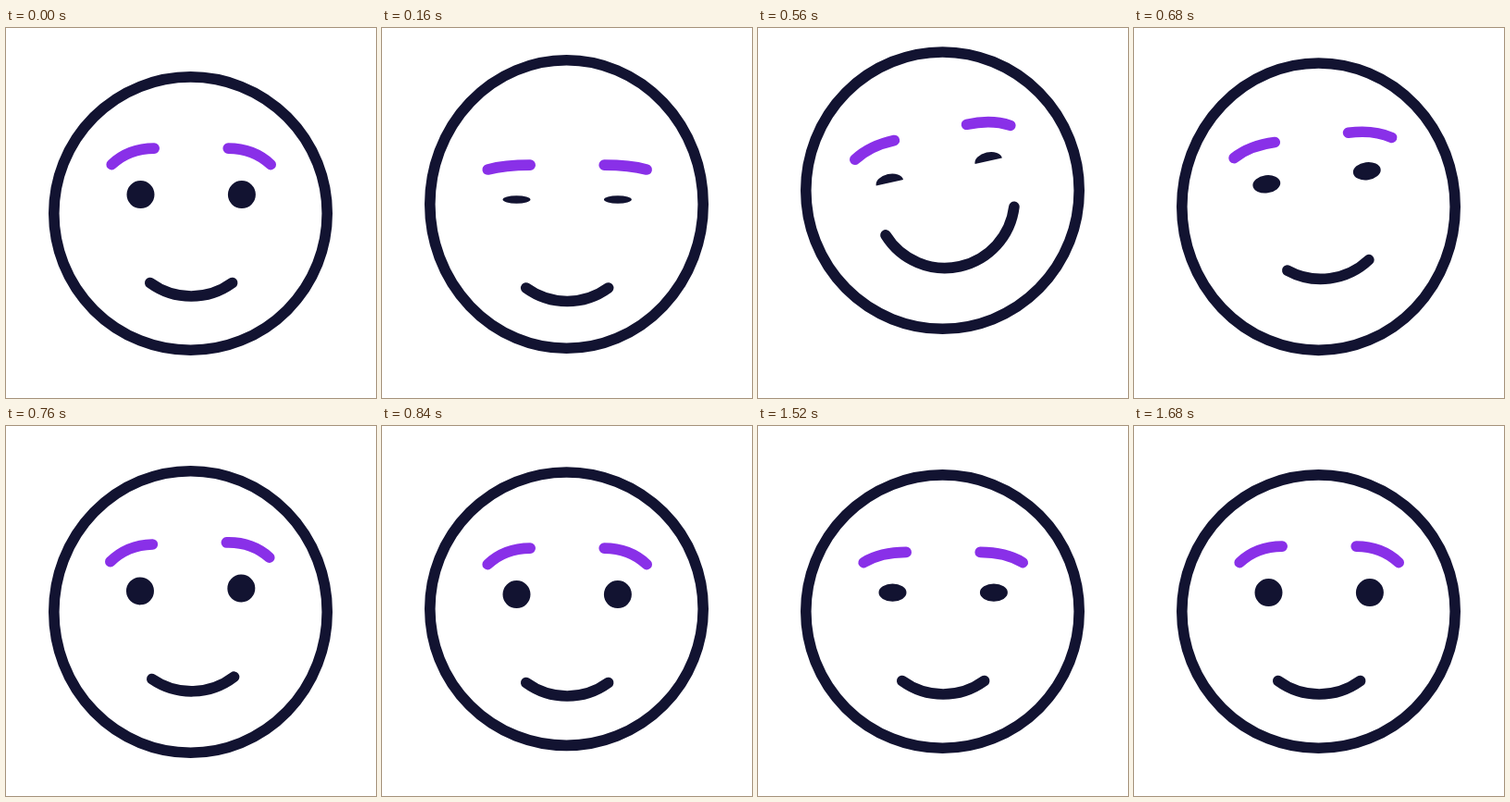
These frames come from a looping animation (400 px wide and 400 px high, 2.56 s). An HTML page:

```html
<!DOCTYPE html>
<html lang="en">
<head>
<meta charset="utf-8">
<title>Smiling face</title>
<style>
  html, body { margin: 0; width: 100%; height: 100%; overflow: hidden; background: #fff; }
  svg { display: block; width: 100vw; height: 100vh; }
  .line { fill: none; stroke: #121331; stroke-width: 11.6; stroke-linecap: round; }
  .brow { stroke: #8930e8; }
  .eye { fill: #121331; }
</style>
</head>
<body>
<svg viewBox="0 0 400 400">
  <ellipse id="head" class="line" cx="199.5" rx="147.7"/>
  <g id="face">
    <path id="brows" class="line brow"/>
    <path id="eyes" class="eye"/>
    <path id="mouth" class="line"/>
  </g>
</svg>
<script>
const LOOP = 2560, STEP = 40;
const CX = 200.2, CY = 200.6, HEAD_R = 147.7;
const EYE_R = 15, EYE_Y = -20.5, BROW_Y = -53;
const MOUTH_R = 75.4, MOUTH_Y = 14;
const GRIN_START = 180, GRIN_END = 620, IDLE_BLINK = 1580;

const $ = id => document.getElementById(id);
const head = $("head"), face = $("face");
const brows = $("brows"), eyes = $("eyes"), mouth = $("mouth");

const both = draw => draw(-1) + draw(1);
const clamp = u => Math.max(0, Math.min(1, u));

// Eased 0 to 1 between two times
function ramp(t, from, to) {
  const u = clamp((t - from) / (to - from));
  return u * u * (3 - 2 * u);
}

// Rises to 1, stays, and falls back to 0
const hold = (t, in0, in1, out0, out1) => ramp(t, in0, in1) - ramp(t, out0, out1);

// One half wave between two times
const bump = (t, from, to) => Math.sin(Math.PI * clamp((t - from) / (to - from)));

// Eyelid opening, narrowest at the given time
const blink = (t, at) => Math.min(1, 0.1 + 0.9 * Math.abs(t - at) / 100);

function drawHead(t) {
  const settle = 3.4 * bump(t, 760, 1000);
  const top = -27 * hold(t, 0, 260, 550, 830) - settle;
  const bottom = -26 * hold(t, 100, 290, 520, 710) - settle
    + 7 * (bump(t, 0, 200) + bump(t, 670, 790));
  head.setAttribute("cy", CY + (top + bottom) / 2);
  head.setAttribute("ry", HEAD_R + (bottom - top) / 2);
}

function moveFace(t) {
  const y = -25 * hold(t, 190, 320, 620, 800)
    + 5.6 * bump(t, 0, 280) + 2.3 * bump(t, 760, 1000);
  const tilt = -12.4 * hold(t, 180, 320, 580, 810);
  face.setAttribute("transform", `translate(${CX} ${CY + y}) rotate(${tilt})`);
}

function drawEyes(t) {
  const open = blink(t, GRIN_START) * blink(t, GRIN_END) * blink(t, IDLE_BLINK);
  const top = BROW_Y - 17.5 * open;
  brows.setAttribute("d", both(s =>
    `M${86 * s} ${BROW_Y}Q${67.5 * s} ${top} ${40 * s} ${top}`));

  // Only the upper half of the eyes shows while grinning
  const grinning = t > GRIN_START && t < GRIN_END;
  eyes.setAttribute("d", both(s => {
    const left = 54.7 * s - EYE_R, right = left + 2 * EYE_R;
    const arc = x => `A${EYE_R} ${EYE_R * open} 0 0 1 ${x} ${EYE_Y}`;
    return `M${left} ${EYE_Y}${arc(right)}${grinning ? "" : arc(left)}Z`;
  }));
}

// The mouth is an arc of a fixed circle that lengthens into a grin
function drawMouth(t) {
  const grin = hold(t, 180, 310, 500, 670);
  const angle = (36.1 + 48.3 * grin) * Math.PI / 180;
  const x = MOUTH_R * Math.sin(angle);
  const y = MOUTH_Y - 7.4 * grin + MOUTH_R * Math.cos(angle);
  mouth.setAttribute("d", `M${-x} ${y}A${MOUTH_R} ${MOUTH_R} 0 0 0 ${x} ${y}`);
}

const start = performance.now();
function tick() {
  const now = (performance.now() - start) % LOOP;
  const t = Math.floor(now / STEP) * STEP;
  drawHead(t);
  moveFace(t);
  drawEyes(t);
  drawMouth(t);
  requestAnimationFrame(tick);
}
tick();
</script>
</body>
</html>
```
